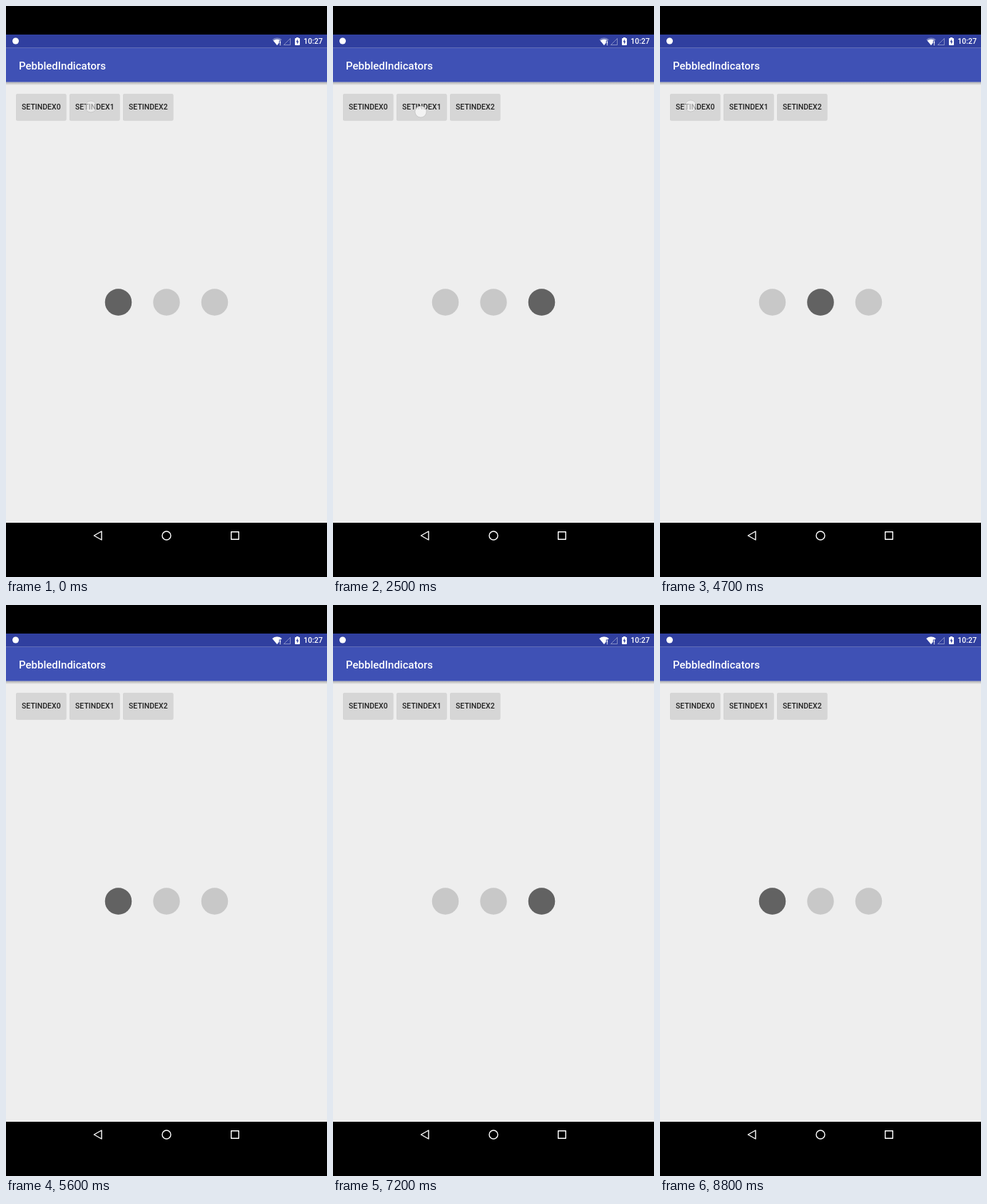
Recreate the animation shown at these times as an HTML page with a canvas. Size 450 px wide and 800 px high, loop 9.2 s.

```html
<!DOCTYPE html>
<html lang="en">
<head>
<meta charset="utf-8">
<title>Indicators</title>
<style>
  html, body { margin: 0; width: 100%; height: 100%; overflow: hidden; background: #000; }
  canvas { display: block; }
</style>
</head>
<body>
<canvas id="stage" width="450" height="800"></canvas>
<script>
const ctx = document.getElementById('stage').getContext('2d');
const LOOP = 9200, STEP = 100;
const LEAD_START = 168, SLIDE = 300;
const DOT_Y = 415, DOT_R = 18.75;
const FONT = 'Roboto, "Noto Sans", sans-serif';

// Each tap: release time, chosen index, time the finger lands, finger position and opacity.
const taps = [
  { at: 0,    to: 1, down: 0,    x: 119, y: 141, alpha: 0.55 },
  { at: 1600, to: 2, down: 1500, x: 199, y: 145, alpha: 0.6 },
  { at: 3200, to: 1, down: 2500, x: 123, y: 148, alpha: 0.8 },
  { at: 4800, to: 0, down: 4700, x: 43,  y: 140, alpha: 0.6 },
  { at: 6400, to: 2, down: 6100, x: 199, y: 145, alpha: 0.7 },
  { at: 8000, to: 0, down: 8000, x: 43,  y: 141, alpha: 0.6 }
];

const clamp = v => Math.min(1, Math.max(0, v));
const ease = v => (1 - Math.cos(Math.PI * clamp(v))) / 2;
const dotX = i => 157.5 + 67.5 * i;
const buttonX = i => 14.3 + 75 * i;

function rect(x, y, w, h, color) {
  ctx.fillStyle = color;
  ctx.fillRect(x, y, w, h);
}

function round(x, y, w, h, r, color) {
  ctx.beginPath();
  ctx.roundRect(x, y, w, h, r);
  ctx.fillStyle = color;
  ctx.fill();
}

function circle(x, y, r, color) {
  ctx.beginPath();
  ctx.arc(x, y, r, 0, Math.PI * 2);
  ctx.fillStyle = color;
  ctx.fill();
}

function polygon(points) {
  ctx.beginPath();
  points.forEach(([x, y]) => ctx.lineTo(x, y));
  ctx.closePath();
}

function text(str, x, y, size, color, align = 'left') {
  ctx.font = `500 ${size}px ${FONT}`;
  ctx.textAlign = align;
  ctx.fillStyle = color;
  ctx.fillText(str, x, y);
}

function fan(r, color) {
  ctx.beginPath();
  ctx.moveTo(380, 55);
  ctx.arc(380, 55, r, -Math.PI * 0.72, -Math.PI * 0.28);
  ctx.closePath();
  ctx.fillStyle = color;
  ctx.fill();
}

function drawStatus(t) {
  rect(0, 40, 450, 18.5, '#303f9f');
  circle(13.5, 49, 4.5, '#fff');

  fan(10.5, 'rgba(255,255,255,.35)');
  fan(t < 5200 ? 8.3 : 10.5, '#fff');
  rect(382.8, 48.5, 3.2, 7, '#303f9f');
  rect(383.8, 49.3, 1.3, 3.6, '#fff');
  rect(383.8, 53.7, 1.3, 1.3, '#fff');

  polygon([[389.5, 54.5], [398.5, 54.5], [398.5, 45.5]]);
  ctx.strokeStyle = 'rgba(255,255,255,.4)';
  ctx.lineWidth = 1;
  ctx.stroke();

  round(405, 45, 7, 10, 1, '#fff');
  rect(407, 44, 3, 1.5, '#fff');
  polygon([[409, 46.4], [406.6, 50.6], [408.1, 50.6], [408.1, 53.6], [410.5, 49.4], [409, 49.4]]);
  ctx.fillStyle = '#303f9f';
  ctx.fill();

  text('10:27', 444, 53.4, 10.5, '#fff', 'right');
}

function drawToolbar() {
  const shade = ctx.createLinearGradient(0, 106.5, 0, 111);
  shade.addColorStop(0, 'rgba(0,0,0,.28)');
  shade.addColorStop(1, 'rgba(0,0,0,0)');
  rect(0, 106.5, 450, 4.5, shade);
  rect(0, 58.5, 450, 48, '#3f51b5');
  text('PebbledIndicators', 18, 89, 15, '#fff');
}

function drawButtons(tap, u) {
  for (let i = 0; i < 3; i++) {
    const x = buttonX(i);
    round(x - 0.3, 123.6, 70.6, 37.2, 2, 'rgba(0,0,0,.12)');
    round(x, 123, 70, 37, 1.5, '#d6d6d6');
    if (i === tap.to) {
      const press = clamp(u / 200) * clamp((750 - u) / 350);
      round(x, 123, 70, 37, 1.5, `rgba(0,0,0,${0.04 * press})`);
    }
    text('SETINDEX' + i, x + 35, 145.3, 10.5, '#212121', 'center');
  }
}

function drawDots(from, to, u) {
  for (let i = 0; i < 3; i++) circle(dotX(i), DOT_Y, DOT_R, '#c8c8c8');
  const slide = start => dotX(from + (to - from) * ease((u - start) / SLIDE));
  const lead = slide(LEAD_START);
  const trail = slide(LEAD_START + SLIDE);
  const left = Math.min(lead, trail) - DOT_R;
  const width = Math.abs(lead - trail) + DOT_R * 2;
  round(left, DOT_Y - DOT_R, width, DOT_R * 2, DOT_R, '#626262');
}

function drawFinger(t) {
  const tap = taps.find(p => t >= p.down && t < p.at + 200);
  if (!tap) return;
  const fade = t < tap.at + STEP ? 1 : 0.6;
  circle(tap.x, tap.y, 8, `rgba(250,250,250,${tap.alpha * fade})`);
  ctx.strokeStyle = `rgba(120,120,120,${0.3 * fade})`;
  ctx.lineWidth = 0.8;
  ctx.stroke();
}

function drawNav() {
  rect(0, 724, 450, 76, '#000');
  ctx.strokeStyle = '#fff';
  ctx.lineWidth = 1.4;
  ctx.lineJoin = 'round';
  polygon([[123.4, 742], [134, 736], [134, 748]]);
  ctx.stroke();
  ctx.beginPath();
  ctx.arc(225, 742, 6, 0, Math.PI * 2);
  ctx.stroke();
  ctx.strokeRect(315.7, 736.7, 10.6, 10.6);
}

function draw(t) {
  const current = taps.findLastIndex(p => t >= p.at);
  const tap = taps[current];
  const from = current ? taps[current - 1].to : 0;
  const u = t - tap.at;

  rect(0, 0, 450, 800, '#000');
  rect(0, 40, 450, 684, '#eee');
  drawToolbar();
  drawStatus(t);
  drawButtons(tap, u);
  drawDots(from, tap.to, u);
  drawFinger(t);
  drawNav();
}

// The screen updates ten times a second.
function tick() {
  const t = performance.now() % LOOP;
  draw(Math.floor(t / STEP) * STEP);
  requestAnimationFrame(tick);
}
tick();
</script>
</body>
</html>
```
